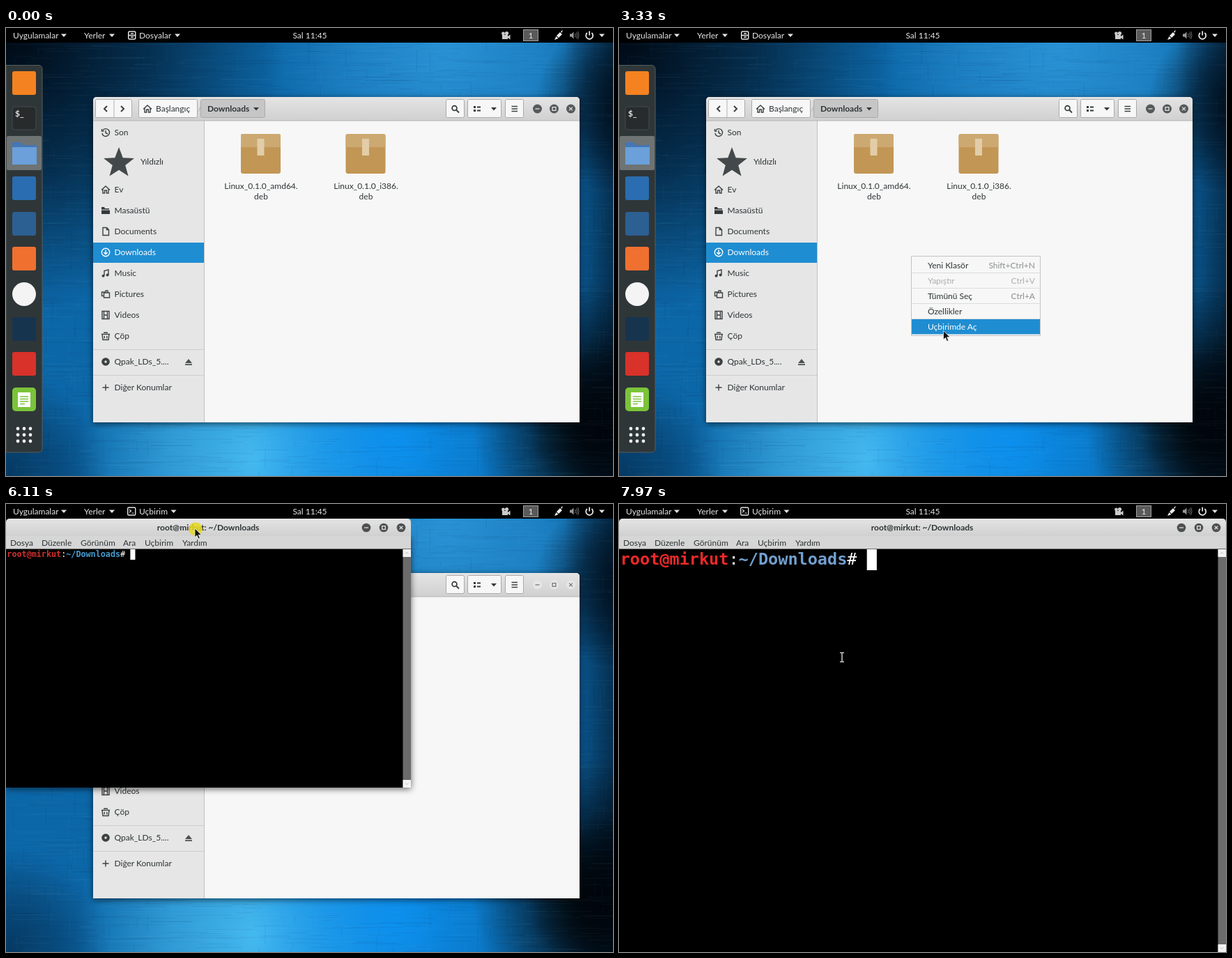
An HTML page with a canvas that plays this animation: 871x643 px, repeating every 8 s.

```html
<!DOCTYPE html>
<html lang="tr">
<head>
<meta charset="utf-8">
<title>Masaüstü</title>
<style>
html, body { margin: 0; width: 100%; height: 100%; overflow: hidden; background: #000; }
canvas, svg { position: absolute; left: 0; top: 0; }
svg text { font: 12px Lato, "Noto Sans", sans-serif; fill: #2e3436; white-space: pre; }
svg .b { font-weight: bold; }
svg .m { text-anchor: middle; }
svg .e { text-anchor: end; }
svg .light { fill: #e4e4e4; }
svg .dim { fill: #8b8e8f; }
svg .off { fill: #acaeae; }
svg .on { fill: #fff; }
#prompt { font-family: "DejaVu Sans Mono", monospace; fill: #fff; }
.ln { fill: none; stroke: #3c4142; stroke-width: 1.4; }
.btn { fill: #f7f7f7; stroke: #aaa; }
.shadow { filter: drop-shadow(0 2px 5px rgba(0,0,0,.6)); }
</style>
</head>
<body>
<canvas id="wall" width="871" height="643"></canvas>
<svg id="stage" width="871" height="643" viewBox="0 0 871 643"></svg>
<script>
const W = 871, H = 643, LOOP = 8000;
const $ = id => document.getElementById(id);

// ---------- markup helpers ----------
const text = (x, y, s, c = '') => `<text x="${x}" y="${y}" class="${c}">${s}</text>`;
const rect = (x, y, w, h, fill, more = '') =>
  `<rect x="${x}" y="${y}" width="${w}" height="${h}" ${fill ? `fill="${fill}"` : ''} ${more}/>`;
const circle = (x, y, r, fill, more = '') => `<circle cx="${x}" cy="${y}" r="${r}" fill="${fill}" ${more}/>`;
const path = (d, fill, more = '') => `<path d="${d}" fill="${fill}" ${more}/>`;
const line = (d, more = '') => `<path class="ln" d="${d}" ${more}/>`;
const caret = (x, y, c) => path(`M${x} ${y}h8l-4 4.5z`, c);
const at = (x, y, s) => `<g transform="translate(${x} ${y})">${s}</g>`;
const button = (x, w, more = '') => rect(x + .5, 102.5, w, 26, '', `class="btn" rx="2" ${more}`);
const controls = (fill, sign) => [0, 24, 48].map((x, i) =>
  circle(x, 0, 6.5, fill) + path(['M-3 0h6', 'M-2.4 -2.4h4.8v4.8h-4.8z', 'M-2.4-2.4l4.8 4.8m0-4.8l-4.8 4.8'][i],
    'none', `stroke="${sign}" stroke-width="1.3" transform="translate(${x} 0)"`)).join('');

// ---------- wallpaper ----------
function paintWall() {
  const c = $('wall').getContext('2d');
  const fill = g => { c.fillStyle = g; c.fillRect(0, 0, W, H); };
  const glow = (x, y, r, rgb, a) => {
    const g = c.createRadialGradient(x, y, 0, x, y, r);
    g.addColorStop(0, `rgba(${rgb},${a})`);
    g.addColorStop(.5, `rgba(${rgb},${a * .6})`);
    g.addColorStop(1, `rgba(${rgb},0)`);
    fill(g);
  };
  fill('#0c67a8');
  glow(630, 30, 260, '50,160,228', .75);
  glow(360, 620, 260, '72,190,245', .95);
  glow(560, 600, 210, '10,146,244', .9);
  glow(0, 10, 400, '0,8,18', 1);
  glow(0, 643, 150, '0,25,50', .6);
  glow(880, 570, 210, '0,0,0', 1);
  glow(880, 570, 130, '0,0,0', 1);
  glow(890, 110, 130, '0,10,20', .9);
  const edge = c.createLinearGradient(800, 0, W, 0);
  edge.addColorStop(0, 'rgba(0,10,22,0)');
  edge.addColorStop(1, 'rgba(0,10,22,.6)');
  fill(edge);
  let seed = 7;
  const rnd = () => (seed = seed * 16807 % 2147483647) / 2147483647;
  for (let i = 0; i < 2600; i++) {
    c.fillStyle = i % 2 ? 'rgba(0,20,50,.07)' : 'rgba(150,215,255,.045)';
    const len = 10 + rnd() * 70, x = rnd() * W, y = rnd() * H;
    i % 5 ? c.fillRect(x, y, len, 1) : c.fillRect(x, y, 1, len * .5);
  }
}

// ---------- desktop parts ----------
const dock = () => {
  const tile = (y, c) => rect(9, y - 17, 34, 34, c, 'rx="3"');
  let dots = '';
  for (let i = 0; i < 9; i++) dots += circle(17 + i % 3 * 9, 575 + (i / 3 | 0) * 9, 2.4, '#eee');
  return path('M0 53.5H47a5 5 0 0 1 5 5V604a5 5 0 0 1-5 5H0z', '#2f3638', 'stroke="#555c5e"') +
    rect(1, 155, 50, 49, '#fff', 'id="active" fill-opacity=".3" rx="2"') +
    tile(79, '#f58220') +
    rect(9, 113, 34, 33, '#272b2c', 'rx="4" stroke="#454a4b"') + text(13, 127, '$_', 'b light') +
    path('M9 164h12l3 4h20v28H9z', '#4377b5') + path('M9 171H44V196H9z', '#6ba0da') +
    tile(230, '#2a6db0') + tile(281, '#2c5f92') + tile(331, '#f07030') +
    circle(26, 382, 17, '#f4f4f4') + tile(432, '#17344f') + tile(482, '#d8322a') +
    rect(9, 516, 34, 34, '#7bc43a', 'rx="5"') + rect(17, 523, 18, 21, '#fff') +
    path('M20 529h12M20 532.5h12M20 536h12M20 539.5h7', 'none', 'stroke="#7bc43a" stroke-width="1.4"') + dots;
};

const star = r => 'M' + Array.from({ length: 10 }, (_, i) => {
  const a = i * Math.PI / 5, k = i % 2 ? r * .42 : r;
  return `${(k * Math.sin(a)).toFixed(1)} ${(-k * Math.cos(a)).toFixed(1)}`;
}).join('L') + 'z';

const house = line('M-6 .5L0-5 6 .5M-4-1V5H-1.4V1H1.4V5H4V-1');

const places = [
  [150, 'Son', line('M-4-3.5A5.4 5.4 0 1 1-5.2 1M-5.5-5v3h3M0-3V.5L3 2')],
  [232, 'Ev', house],
  [262, 'Masaüstü', path('M-6-5h4l1 2h6v1.5H-6zM-6-.5H6V5H-6z', '#33393a')],
  [292, 'Documents', line('M-4-5.5H1.5L4.5-2.5V5.5H-4zM1.5-5.5v3h3')],
  [322, 'Downloads', line('M0-3.5V2.5M-2.6 0L0 2.8 2.6 0', 'style="stroke:#fff"') +
    circle(0, 0, 5.7, 'none', 'stroke="#fff" stroke-width="1.4"')],
  [352, 'Music', line('M-2 3.5V-3.5L4-5V2') + circle(-3.5, 3.7, 2, '#3c4142') + circle(2.6, 2.4, 2, '#3c4142')],
  [382, 'Pictures', line('M-2.5-2H5.5V5H-2.5zM-2.5 2.5H-5.5V-3H-1M0-2V-5h3v3')],
  [412, 'Videos', line('M-5-5.5H5V5.5H-5zM-2.5-5.5v11M2.5-5.5v11M-2.5 0h5')],
  [442, 'Çöp', line('M-5-2.5H5L4 5.5H-4zM-6-2.5H6M-3-4.8H3M-1.8 0v3.5M1.8 0v3.5')],
  [479, 'Qpak_LDs_5....', circle(0, 0, 5.8, '#3c4142') + circle(0, 0, 1.7, '#e6e6e6')],
  [516, 'Diğer Konumlar', line('M-4.5 0H4.5M0-4.5V4.5')]
];

const deb = (x, arch) => rect(x - 28.5, 152, 57, 57, '#c29655', 'rx="3"') +
  path(`M${x - 28.5} 171v-16a3 3 0 0 1 3-3h51a3 3 0 0 1 3 3v16z`, '#cda972') +
  rect(x - 5, 159, 10, 24, '#e2cda8') +
  text(x + .5, 231, `Linux_0.1.0_${arch}.`, 'm') + text(x + .5, 246, 'deb', 'm');

const files = () =>
  path('M125 566V104a5 5 0 0 1 5-5H818a5 5 0 0 1 5 5V566z', '#f7f7f7', 'class="shadow"') +
  path('M125 133V104a5 5 0 0 1 5-5H818a5 5 0 0 1 5 5V133z', 'url(#bar)') +
  rect(125, 133, 159, 433, '#e6e6e6') + rect(284, 133, 1, 433, '#c0c0c0') + rect(125, 132.5, 698, 1, '#b4b4b4') +
  button(128, 52) + rect(154.5, 103, 1, 26, '#b4b4b4') +
  line('M145 112l-4 4 4 4M165 112l4 4-4 4', 'style="stroke-width:2"') +
  button(190, 84) + at(203, 116, house) + text(215, 120, 'Başlangıç') + text(275.5, 120, '/', 'off') +
  button(279, 92, 'style="fill:#c6c6c6"') + text(289, 120, 'Downloads', 'b') + caret(355, 114, '#33393a') +
  button(631, 26) + line('M646 117.5l4 4', 'style="stroke-width:2"') +
  circle(643.5, 115, 3.4, 'none', 'stroke="#33393a" stroke-width="1.7"') +
  button(662, 48) + path('M671 112h3v3h-3zM671 117h3v3h-3zM676 112.5h5v2h-5zM676 117.5h5v2h-5z', '#33393a') +
  caret(696, 114, '#33393a') +
  button(716, 26) + line('M725.5 112.5h8.5M725.5 116h8.5M725.5 119.5h8.5', 'style="stroke-width:1.7"') +
  `<g id="ctlOn">${at(762.5, 116, controls('#55595a', '#e4e4e4'))}</g>` +
  `<g id="ctlOff">${at(762.5, 116, controls('#e6e6e6', '#777'))}</g>` +
  rect(125, 308, 159, 29, '#1f8dd1') +
  places.map(([y, s, icon]) => at(143, y, icon) + text(155.5, y + 4, s, y === 322 ? 'on' : '')).join('') +
  at(162, 194, path(star(23), '#43494a')) + text(193, 196, 'Yıldızlı') +
  rect(125, 461, 159, 1, '#cdcdcd') + rect(125, 498, 159, 1, '#cdcdcd') +
  path('M257 481l5-6 5 6zM257 482.3h10v1.7h-10z', '#4c5152') +
  deb(365.5, 'amd64') + deb(516, 'i386');

const items = [['Yeni Klasör', 'Shift+Ctrl+N'], ['Yapıştır', 'Ctrl+V'], ['Tümünü Seç', 'Ctrl+A'], ['Özellikler', ''], ['Uçbirimde Aç', '']];
const menu = () => rect(419.5, 327.5, 185, 114, '#f7f7f7', 'stroke="#c3c3c3"') +
  items.map(([s, key], i) => {
    const y = 329 + i * 22;
    return (i ? rect(420, y, 184, 1, '#dcdcdc') : '') +
      rect(420, y + 1, 184, 21.5, '#1f8dd1', 'class="hover"') +
      text(443, y + 16, s, i === 1 ? 'off' : 'item') + text(597, y + 16, key, i === 1 ? 'off e' : 'dim e');
  }).join('');

const terminal = () =>
  rect(0, 46, 581, 361, '#000', 'id="body" class="shadow"') + rect(581, 21, 9, 26, '#000', 'id="gap"') +
  path('', 'url(#bar)', 'id="head"') + rect(0, 46, 581, 18.5, '#d6d6d6', 'id="menubar"') +
  text(290, 38, 'root@mirkut: ~/Downloads', 'b m').replace('<text', '<text id="title"') +
  `<g id="ctl">${[0, 25, 50].map((x, i) => circle(x, 34, 6.3, '#4d5152') +
    path(['M-3 0h6', 'M-2.3-2.3h4.6v4.6h-4.6z', 'M-2.3-2.3l4.6 4.6m0-4.6l-4.6 4.6'][i], 'none',
      `stroke="#e0e0e0" stroke-width="1.3" transform="translate(${x} 34)"`)).join('')}</g>` +
  [[6, 'Dosya'], [51, 'Düzenle'], [107, 'Görünüm'], [168, 'Ara'], [199, 'Uçbirim'], [253, 'Yardım']]
    .map(([x, s]) => text(x, 60, s)).join('') +
  `<g id="scroll">${rect(0, 65, 11.5, 400, '#6b6b6b', 'id="trough"') + rect(0, 65, 11.5, 11, '#f2f2f2') +
    path('M3.5 71.5l2.2-2.2 2.2 2.2', 'none', 'stroke="#bbb"')}<g id="down">${rect(0, -11, 11.5, 11, '#f2f2f2') +
    path('M3.5 -6.5l2.2 2.2 2.2-2.2', 'none', 'stroke="#bbb"')}</g></g>` +
  '<text id="prompt"><tspan id="user" class="b">root@mirkut</tspan>:<tspan id="dir" class="b">~/Downloads</tspan>#</text>' +
  rect(0, 65, 8, 15, '#fff', 'id="block"');

const topbar = () => rect(0, 0, W, 21, '#000') +
  text(10, 15, 'Uygulamalar', 'light') + caret(79, 8.5, '#e4e4e4') +
  text(112, 15, 'Yerler', 'light') + caret(148, 8.5, '#e4e4e4') +
  `<g id="appFiles">${rect(175.7, 5, 10, 11, 'none', 'rx="1.5" stroke="#e4e4e4" stroke-width="1.5"') +
    path('M176 10.5h10M179 8h4M179 13h4', 'none', 'stroke="#e4e4e4" stroke-width="1.3"') +
    text(191, 15, 'Dosyalar', 'light') + caret(242, 8.5, '#e4e4e4')}</g>` +
  `<g id="appTerm">${rect(174.7, 5, 11, 11, 'none', 'rx="1.5" stroke="#e4e4e4" stroke-width="1.4"') +
    path('M177 8l2.5 2-2.5 2M180.5 13h3', 'none', 'stroke="#e4e4e4" stroke-width="1.2"') +
    text(191, 15, 'Uçbirim', 'light') + caret(236.5, 8.5, '#e4e4e4')}</g>` +
  text(436, 15, 'Sal 11:45', 'm light') +
  circle(713.5, 8, 2.4, '#ccc') + circle(718.5, 7.5, 2.6, '#ccc') + rect(712, 10, 8, 6, '#ccc') + path('M720 12l3.5-2.5v7l-3.5-2.5z', '#ccc') +
  rect(742.5, 2.5, 21, 16, '#5a5a5a', 'stroke="#a0a0a0"') + text(753, 15, '1', 'm light') +
  path('M787 17l2.5-5 3 3zM790 11l5-5 3 3-5 5zM796 5l3-2-1.5 4z', '#eee') +
  path('M809 8.5h2.5l3-3v10l-3-3H809z', '#999') + path('M816.5 8q1.5 2.5 0 5M818.5 6.5q2.5 4 0 8M820.5 5q3 5.5 0 11', 'none', 'stroke="#777"') +
  path('M834 7a5 5 0 1 0 6.4 0M837.2 4.5v6', 'none', 'stroke="#eee" stroke-width="1.7"') + caret(851, 8.5, '#e4e4e4');

const pointer = () => circle(1, 1, 9.7, '#e8d81c', 'id="halo" fill-opacity=".85"') +
  path('M0 0V12.8L3 10 5 15 7.2 14 5.2 9.3H9.4z', '#111', 'id="arrow" stroke="#fff" stroke-width=".7"') +
  `<g id="beam" fill="none">${['#222" stroke-width="3', '#ddd" stroke-width="1.2'].map(s =>
    `<path d="M-3-6.5H3M-3 6.5H3M0-6V6" stroke="${s}"/>`).join('')}</g>`;

$('stage').innerHTML =
  '<defs><linearGradient id="bar" x2="0" y2="1"><stop stop-color="#e4e4e4"/><stop offset="1" stop-color="#d0d0d0"/></linearGradient></defs>' +
  [['files', files], ['dock', dock], ['menu', menu], ['term', terminal], ['top', topbar], ['mouse', pointer]]
    .map(([id, make]) => `<g id="${id}">${make()}</g>`).join('');
paintWall();

// ---------- timeline ----------
// start, end, steps, from x, from y, to x, to y
const moves = [
  [300, 850, 7, 735, 612, 424, 329],
  [2090, 2170, 1, 421, 328, 418.5, 327.5],
  [2790, 3100, 4, 424, 345, 463, 435],
  [3330, 3330, 1, 465.5, 434.5, 465.5, 434.5],
  [4950, 5730, 10, 461, 425, 274, 48],
  [5810, 5890, 1, 272, 40, 271, 35],
  [6340, 6570, 3, 276, 58, 320, 220]
];
const clicks = [[850, 1080], [2320, 2390], [3860, 4030], [5960, 6040], [6110, 6190]];
const blinks = [5020, 5610, 6235, 6800, 7430, 7970];
const zooms = [[0, 7.08], [7120, 8.65], [7430, 10.2], [7580, 11.85], [7810, 14.16]];

const last = (rows, t) => rows.filter(r => t >= r[0]).pop();
const show = (id, on) => $(id).setAttribute('visibility', on ? 'inherit' : 'hidden');
const set = (id, attrs) => { for (const k in attrs) $(id).setAttribute(k, attrs[k]); };

function mouseAt(t) {
  const m = last(moves, t);
  if (!m) return null;
  const [a, b, n, x0, y0, x1, y1] = m;
  const p = b > a ? Math.min(1, Math.floor((t - a) / (b - a) * n + .05) / n) : 1;
  const k = p * p * (3 - 2 * p);
  return [x0 + (x1 - x0) * k, y0 + (y1 - y0) * k];
}

function layoutTerm(t) {
  const w = t < 6190 ? 581 : W, h = t < 6190 ? 407 : H, hw = t < 6270 ? 581 : W;
  set('body', { width: w, height: h - 46 });
  set('menubar', { width: w });
  set('head', { d: `M0 46V26a5 5 0 0 1 5-5H${hw - 5}a5 5 0 0 1 5 5V46z` });
  set('title', { x: hw / 2 - .5 });
  set('ctl', { transform: `translate(${hw - 64} 0)` });
  set('scroll', { transform: `translate(${w - 11.5} 0)` });
  set('trough', { height: h - 65 });
  set('down', { transform: `translate(0 ${h})` });
  show('gap', w > hw);

  const cell = last(zooms, t)[1], size = cell / .602, x = 1 + cell * .05, big = t >= 7120;
  $('prompt').style.fontSize = size + 'px';
  set('prompt', { x, y: 65 + size * .94 });
  $('user').style.fill = big ? '#ef2929' : '#d0302c';
  $('dir').style.fill = big ? '#729fcf' : '#459cd0';
  set('block', { x: x + cell * 25, width: cell, height: cell * 2.12 });
  show('block', blinks.filter(b => t >= b).length % 2 === 0);
}

function draw(t) {
  const termOpen = t >= 4640, focusTerm = t >= 4490, pos = mouseAt(t);
  show('dock', !termOpen);
  show('active', !focusTerm);
  show('appFiles', !focusTerm);
  show('appTerm', focusTerm);
  show('ctlOn', !termOpen);
  show('ctlOff', termOpen);
  show('files', t < 6190);
  show('menu', t >= 2390 && t < 4030);
  show('term', termOpen);
  layoutTerm(t);

  const row = pos && t >= 2790 ? Math.min(4, Math.floor((pos[1] - 329) / 22)) : -1;
  document.querySelectorAll('.hover').forEach((el, i) =>
    el.setAttribute('visibility', i === row && i !== 1 ? 'inherit' : 'hidden'));
  document.querySelectorAll('.item').forEach((el, i) =>
    el.style.fill = (i ? i + 1 : 0) === row ? '#fff' : '');

  show('mouse', pos);
  if (!pos) return;
  const [x, y] = pos;
  const beam = termOpen && y > 65 && (t >= 6190 || (y < 407 && x < 569));
  set('mouse', { transform: `translate(${x} ${y})` });
  show('arrow', !beam);
  show('beam', beam);
  show('halo', clicks.some(([a, b]) => t >= a && t < b));
}

const start = performance.now();
function tick() {
  draw((performance.now() - start) % LOOP);
  requestAnimationFrame(tick);
}
tick();
</script>
</body>
</html>
```
